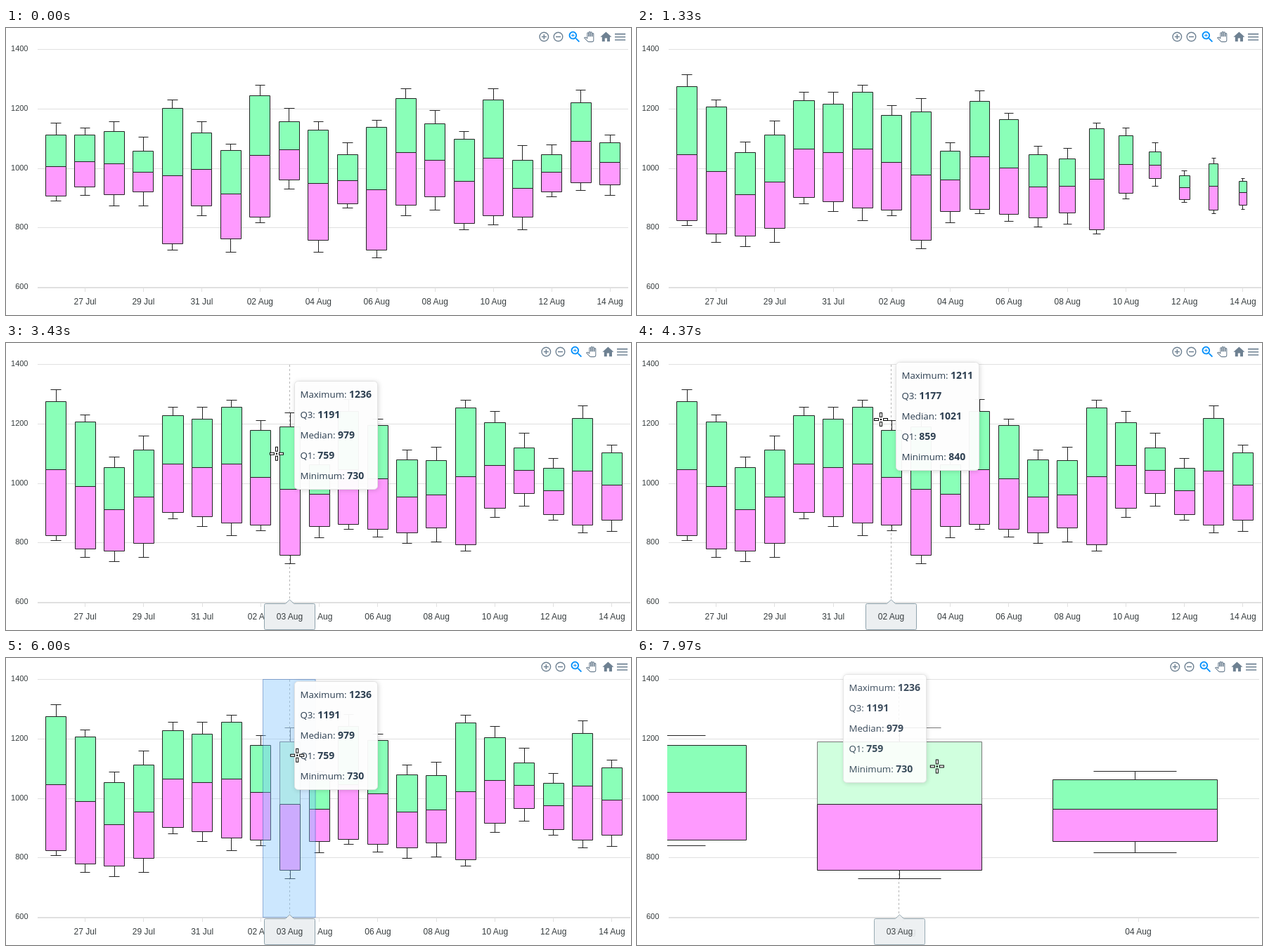
An HTML page for the animation above (8000 ms loop, 889 px wide and 409 px high).

```html
<!DOCTYPE html>
<html lang="en">
<head>
<meta charset="utf-8">
<title>Box plot</title>
<style>
html, body { margin: 0; width: 100%; height: 100%; overflow: hidden; background: #fff; }
svg { display: block; width: 889px; height: 409px; }
text { font-family: "Liberation Sans", Arial, sans-serif; font-size: 12px; fill: #373d3f; }
.y { font-size: 11px; text-anchor: end; }
.mid { text-anchor: middle; }
#tip text { font-family: "Open Sans", sans-serif; font-size: 13.3px; fill: #2c3e50; white-space: pre; }
#tip .val { font-size: 14px; font-weight: 700; }
#tip rect { filter: drop-shadow(1px 1px 3px rgba(0,0,0,.16)); }
</style>
</head>
<body>
<svg viewBox="0 0 889 409">
  <defs><clipPath id="plot"><rect x="43" y="0" width="846" height="409"/></clipPath></defs>
  <g id="grid" stroke="#e0e0e0"></g>
  <g id="axis"></g>
  <path id="cross" stroke="#b6b6b6" stroke-dasharray="3" fill="none"/>
  <g id="boxes" clip-path="url(#plot)"></g>
  <rect id="sel" y="30.5" height="339" fill="#80c4fd" fill-opacity=".4" stroke="#0d47a1" stroke-opacity=".4"/>
  <g id="tools" fill="#6e8192">
    <path transform="translate(759.9 4.1) scale(.7)" d="M13 7h-2v4H7v2h4v4h2v-4h4v-2h-4V7zM12 2a10 10 0 1 0 0 20a10 10 0 1 0 0-20zm0 18a8 8 0 1 1 0-16a8 8 0 1 1 0 16z"/>
    <path transform="translate(780.1 4.1) scale(.7)" d="M7 11v2h10v-2zM12 2a10 10 0 1 0 0 20a10 10 0 1 0 0-20zm0 18a8 8 0 1 1 0-16a8 8 0 1 1 0 16z"/>
    <path fill="#008ffb" transform="translate(801 2.2) scale(.88)" d="M15.5 14h-.79l-.28-.27C15.41 12.59 16 11.11 16 9.5 16 5.91 13.09 3 9.5 3S3 5.91 3 9.5 5.91 16 9.5 16c1.61 0 3.09-.59 4.23-1.57l.27.28v.79l5 4.99L20.49 19l-4.99-5zm-6 0C7.01 14 5 11.99 5 9.5S7.01 5 9.5 5 14 7.01 14 9.5 11.99 14 9.5 14zM12 10h-2v2H9v-2H7V9h2V7h1v2h2v1z"/>
    <path fill="none" stroke="#6e8192" stroke-width="1.8" transform="translate(825 5.2) scale(.6)" d="M23 5.5V20c0 2.2-1.8 4-4 4h-7.3c-1.1 0-2.1-.4-2.9-1.2L1 14.8l1.3-1.2c.5-.4 1-.3 1.4-.1L8 15.9V4a1.5 1.5 0 0 1 3 0v7h1V1.5a1.5 1.5 0 0 1 3 0V11h1V2.5a1.5 1.5 0 0 1 3 0V11h1V5.5a1.5 1.5 0 0 1 3 0z"/>
    <path transform="translate(846.8 3.2) scale(.8)" d="M10 20v-6h4v6h5v-8h3L12 3 2 12h3v8z"/>
    <path transform="translate(866.5 2.7) scale(.84)" d="M3 18h18v-2H3v2zm0-5h18v-2H3v2zm0-7v2h18V6H3z"/>
  </g>
  <g id="xtip">
    <path d="M-34 371.5H-6L0 365.8L6 371.5H34Q36 371.5 36 373.5V406.5Q36 408.5 34 408.5H-34Q-36 408.5 -36 406.5V373.5Q-36 371.5 -34 371.5Z" fill="#eceff1" stroke="#90a4ae"/>
    <text class="mid" y="394"></text>
  </g>
  <g id="tip"><rect x=".5" y=".5" width="118" height="154" rx="5" fill="#fff" fill-opacity=".95" stroke="#e3e3e3"/></g>
  <g id="cursor" fill="none">
    <path d="M-10 0H-3M3 0H10M0 -10V-3M0 3V10" stroke="#000" stroke-width="4"/>
    <path d="M-9 0H-4M4 0H9M0 -9V-4M0 4V9" stroke="#fff" stroke-width="2"/>
    <circle r="1.2" fill="#000"/>
  </g>
</svg>
<script>
const LOOP = 8000, REDRAW = 130, GROW = 244, ENTER = 1960, SELECT = 5280, ZOOM = 6870, REENTER = 7870;
const LAG = 120;    // the drawn cursor trails the pointer
const GLIDE = 150;  // time the tooltips take to slide to another day
const NAMES = ['Maximum', 'Q3', 'Median', 'Q1', 'Minimum'];
const COLORS = [['#8affb8', '#d0ffde'], ['#fe9afe', '#ffd2fc']];

// the daily quartiles; median and whiskers follow from them
const before = series(
  [1111,1112,1123,1058,1202,1118,1059,1245,1157,1129,1047,1139,1235,1151,1098,1229,1027,1046,1221,1085],
  [907,937,911,920,747,874,762,836,960,758,881,724,875,904,815,841,835,922,952,945]);
const after = series(
  [1275,1207,1054,1113,1227,1216,1256,1177,1191,1062,1243,1195,1080,1077,1253,1205,1119,1051,1218,1103],
  [824,779,773,798,903,887,867,859,759,856,861,845,834,849,794,917,965,894,860,876]);

// pointer path: time, x, y
const path = [[1710,440,430], [2080,417,259], [2200,411,184], [3310,385,158], [3430,379,132], [3610,372,132],
  [4010,372,132], [4250,347,109], [4370,343,105], [4510,330,82], [5010,330,82], [SELECT,365.5,100],
  [5880,414,139], [6000,440,111], [6380,469,135], [7750,469,135], [7850,427,155], [7970,405,101]];

function series(q3s, q1s) {
  return q3s.map((q3, i) => {
    const q1 = q1s[i];
    const median = Math.round((q3 + q1) / 2) + (i + 1) % 11 - 5;
    return [q3 + 22 + (11 * i + 19) % 28, q3, median, q1, q1 - 14 - (10 * i + 3) % 34];
  });
}

const $ = id => document.getElementById(id);
const clamp = v => Math.max(0, Math.min(1, v));
const yOf = v => 30.5 + (1400 - v) * .42375;
const snap = v => Math.floor(v) + .5;

function set(el, attrs) { for (const k in attrs) el.setAttribute(k, attrs[k]); }
function show(el, on) { el.style.display = on ? '' : 'none'; }
function add(parent, tag, attrs = {}, text) {
  const el = document.createElementNS('http://www.w3.org/2000/svg', tag);
  set(el, attrs);
  if (text) el.textContent = text;
  return parent.appendChild(el);
}

function pointer(t) {
  const n = path.findIndex(k => k[0] > t);
  if (n === 0) return path[0].slice(1);
  if (n < 0) return path[path.length - 1].slice(1);
  const [t0, x0, y0] = path[n - 1], [t1, x1, y1] = path[n];
  const p = (t - t0) / (t1 - t0);
  return [x0 + (x1 - x0) * p, y0 + (y1 - y0) * p];
}

function dateOf(i) {
  const d = 26 + i;
  return d > 31 ? String(d - 31).padStart(2, '0') + ' Aug' : d + ' Jul';
}

const gridLines = [];
for (let v = 1400; v >= 600; v -= 200) {
  const y = snap(yOf(v));
  gridLines.push(add($('grid'), 'line', { x1: 45, y1: y, y2: y }));
  add($('axis'), 'text', { class: 'y', x: 31.5, y: y + 2 }, String(v));
}
gridLines.push(add($('grid'), 'line', { x1: 45, y1: 370.5, y2: 370.5 }));

const ticks = after.map((_, i) => ({
  line: add($('grid'), 'line', { y1: 370, y2: 376 }),
  label: add($('axis'), 'text', { class: 'mid', y: 394 }, dateOf(i))
}));
const shapes = after.map(() => COLORS.map(() => add($('boxes'), 'path')));
const values = NAMES.map((name, i) => {
  const row = add($('tip'), 'text', { x: 8.4, y: 24 + i * 29 });
  add(row, 'tspan', {}, name + ': ');
  return add(row, 'tspan', { class: 'val' });
});

function halfBox(cx, w, ...ys) {
  const [mid, edge, end] = ys.map(snap);
  const [l, r, c, capL, capR] = [-w, w, 0, -w / 2, w / 2].map(d => snap(cx + d));
  return `M${l} ${mid}V${edge}H${r}V${mid}ZM${c} ${edge}V${end}M${capL} ${end}H${capR}`;
}

function draw(t) {
  const old = t < REDRAW, zoomed = t >= ZOOM;
  const data = old ? before : after;
  const right = old || zoomed ? 885 : 888;
  const step = zoomed ? 335 : old ? 41.48 : 41.63;
  const origin = zoomed ? 373.5 - 8 * step : 71;
  const xOf = i => origin + i * step;
  const half = step * .35;

  gridLines.forEach(l => l.setAttribute('x2', right));
  $('tools').setAttribute('transform', `translate(${right - 888} 0)`);
  ticks.forEach(({ line, label }, i) => {
    const x = xOf(i) + (zoomed ? 4.5 : 0);
    const on = zoomed ? x > 45 && x < right : i % 2 === 1;
    show(line, on);
    show(label, on);
    set(line, { x1: snap(x), x2: snap(x) });
    label.setAttribute('x', x);
  });

  const [px, py] = pointer(t);
  const [cx, cy] = pointer(t - LAG);
  const dayAt = time => Math.round((pointer(time - LAG)[0] - origin) / step);
  const day = dayAt(t);
  const active = t >= ENTER && !zoomed || t >= REENTER;

  data.forEach((d, i) => {
    const x = xOf(i), y = d.map(yOf);
    const p = old || zoomed ? 1 : clamp((t - GROW - i * 40) / 800);
    const s = (1 - Math.cos(Math.PI * p)) / 2;
    const [max, q3, med, q1, min] = y.map(v => y[3] + (v - y[3]) * s);
    const over = active && Math.abs(cx - x) < half;
    const lit = [over && cy > q3 && cy < med, over && cy >= med && cy < q1];
    const outline = [halfBox(x, half * s, med, q3, max), halfBox(x, half * s, med, q1, min)];
    shapes[i].forEach((el, k) => {
      show(el, s > 0);
      set(el, { d: outline[k], fill: COLORS[k][+lit[k]], stroke: lit[k] ? '#777' : '#222' });
    });
  });

  ['cross', 'xtip', 'tip'].forEach(id => show($(id), active));
  if (active) {
    const lineX = i => snap(xOf(i) - .8);
    let x = 0;
    for (let k = 0; k < 15; k++) x += lineX(dayAt(t - k * GLIDE / 15)) / 15;
    const opacity = clamp((t - (zoomed ? REENTER : ENTER)) / 110);
    $('cross').setAttribute('d', `M${lineX(day)} 31V370`);
    set($('xtip'), { transform: `translate(${x + (zoomed ? 1 : 0)} 0)`, opacity });
    $('xtip').lastElementChild.textContent = dateOf(day);
    set($('tip'), { transform: `translate(${Math.round(x + (zoomed ? -79 : 6.5))} ${Math.round(py - 78)})`, opacity });
    values.forEach((el, i) => { el.textContent = data[day][i]; });
  }

  const selecting = t >= SELECT && !zoomed;
  show($('sel'), selecting);
  if (selecting) set($('sel'), { x: 365.5, width: px - 365.5 });
  $('cursor').setAttribute('transform', `translate(${cx} ${cy})`);
}

const start = performance.now();
function tick() {
  draw((performance.now() - start) % LOOP);
  requestAnimationFrame(tick);
}
tick();
</script>
</body>
</html>
```
